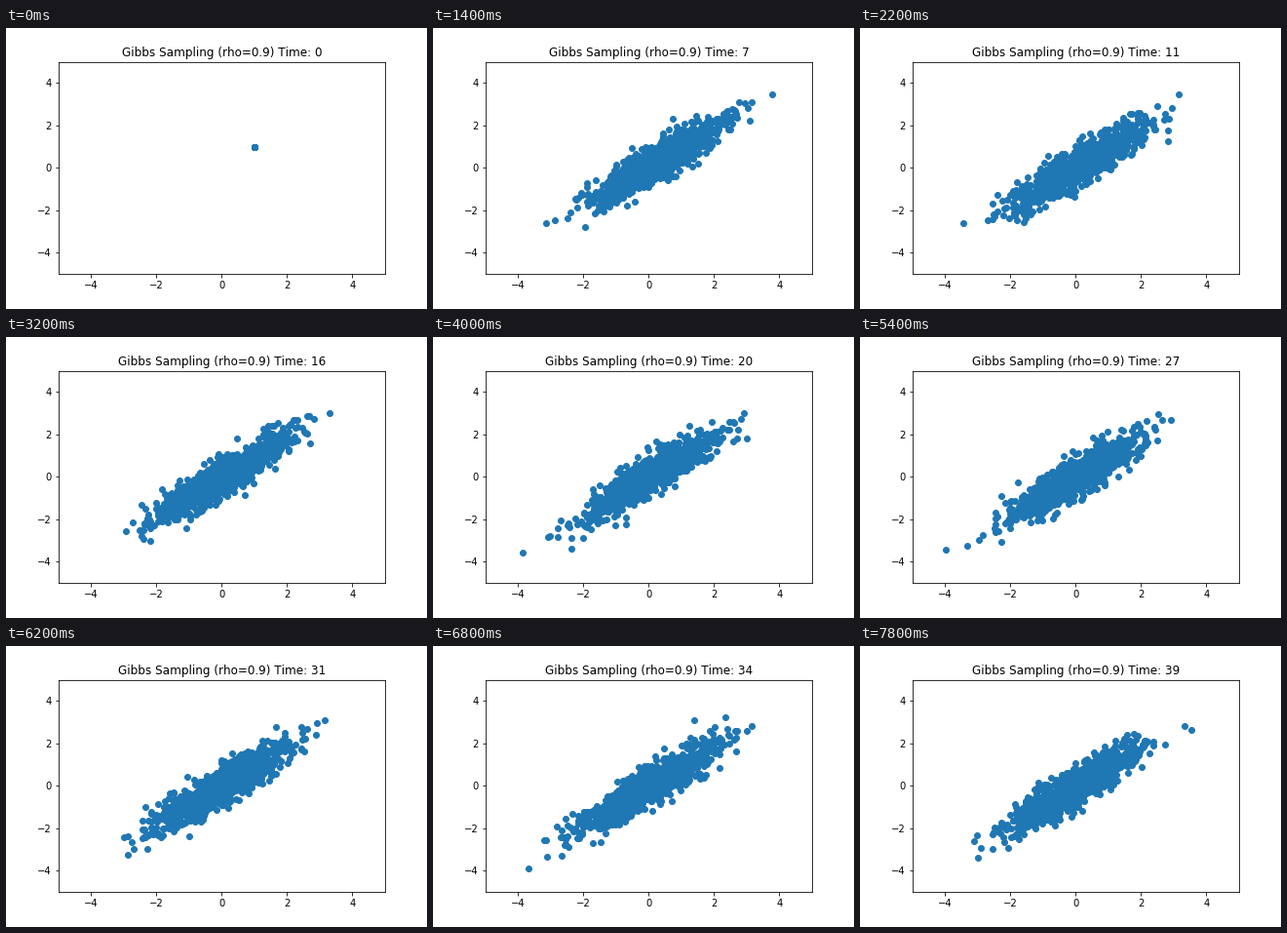
These frames come from a looping animation (432x288 px, 8 s). A matplotlib script:

```python
import numpy as np
import matplotlib.pyplot as plt
from matplotlib.animation import FuncAnimation

RHO = 0.9
STEPS = 40
CHAINS = 1000
START = 1.0

plt.rcParams["text.kerning_factor"] = 6


def gibbs(rng):
    """Run all chains from one point, drawing x given y, then y given x."""
    sd = np.sqrt(1 - RHO ** 2)
    x = np.full((STEPS, CHAINS), START)
    y = x.copy()
    for t in range(1, STEPS):
        x[t] = rng.normal(RHO * y[t - 1], sd)
        y[t] = rng.normal(RHO * x[t], sd)
    return x, y


xs, ys = gibbs(np.random.default_rng(5))

fig, ax = plt.subplots(figsize=(6, 4), dpi=72)
fig.subplots_adjust(left=0.125, right=0.9, bottom=0.125, top=0.88)
ax.set(xlim=(-5, 5), ylim=(-5, 5),
       xticks=range(-4, 5, 2), yticks=range(-4, 5, 2))
dots, = ax.plot([], [], "o", color="C0")
title = ax.set_title("")


def draw(t):
    dots.set_data(xs[t], ys[t])
    title.set_text(f"Gibbs Sampling (rho={RHO}) Time: {t}")
    return dots, title


anim = FuncAnimation(fig, draw, frames=STEPS, interval=200, repeat=True)
plt.show()
```
